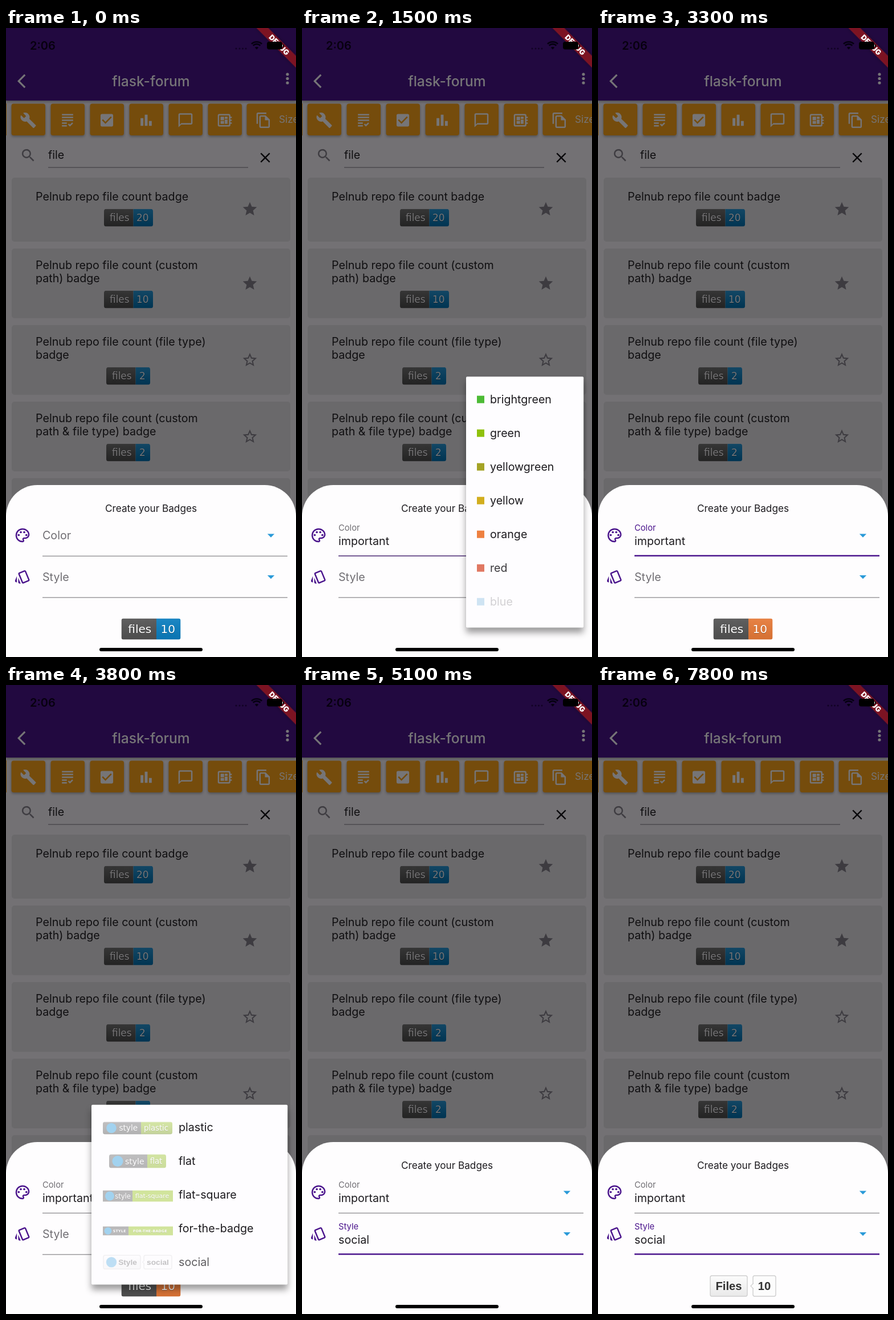
An HTML page for the animation above (8 s loop, 509 by 1101 pixels).

```html
<!DOCTYPE html>
<html lang="en">
<head>
<meta charset="utf-8">
<title>Badge builder</title>
<style>
html, body { margin: 0; width: 100%; height: 100%; overflow: hidden; background: #737174; }
svg { display: block; width: 509px; height: 1101px; }
text { font-family: Inter, Roboto, sans-serif; font-optical-sizing: none; white-space: pre; }
.badge { font-family: "DejaVu Sans", Verdana, sans-serif; }
.social { font-family: "Liberation Sans", Arial, sans-serif; font-weight: 700; }
.raised { filter: drop-shadow(0 2px 2px rgba(0,0,0,.3)); }
.menu { filter: drop-shadow(0 9px 6px rgba(0,0,0,.38)); }
</style>
</head>
<body>
<svg id="stage" viewBox="0 0 509 1101" xmlns="http://www.w3.org/2000/svg"></svg>
<script>
const LOOP = 8000, STEP = 100, BODY = 19.67, ROW = 59.01, PAD = 9.84, BOTTOM = 1049.4, RIGHT = 494.2;
const PURPLE = [74, 20, 140], GREY = [112, 110, 115], RULE = [137, 135, 139];
const INK = '#1d1b1f', PALE = '#767577', ORANGE = '#ec7c38';
const stage = document.getElementById('stage');
const $ = id => document.getElementById(id);
const clamp = x => Math.max(0, Math.min(1, x));
const mix = (a, b, k) => `rgb(${a.map((c, i) => Math.round(c + (b[i] - c) * k))})`;

const ICONS = {
  build: 'M22.7 19l-9.1-9.1c.9-2.3.4-5-1.5-6.9-2-2-5-2.4-7.4-1.3L9 6 6 9 1.6 4.7C.4 7.1.9 10.1 2.9 12.1c1.9 1.9 4.6 2.4 6.9 1.5l9.1 9.1c.4.4 1 .4 1.4 0l2.3-2.3c.5-.4.5-1.1.1-1.4z',
  grading: 'M4 3h16v2H4zM4 7h16v2H4zM4 11h16v2H4zM4 15h7v2H4zM4 19h7v2H4zM15.4 18.2L14 16.75l-1.4 1.4L15.4 21 20 16.4 18.6 15z',
  check: 'M19 3H5c-1.1 0-2 .9-2 2v14c0 1.1.9 2 2 2h14c1.1 0 2-.9 2-2V5c0-1.1-.9-2-2-2zm-9 14l-5-5 1.4-1.4L10 14.17l7.6-7.6L19 8z',
  chart: 'M4 9h4v11H4zM10 4h4v16h-4zM16 13h4v7h-4z',
  chat: 'M20 2H4c-1.1 0-2 .9-2 2v18l4-4h14c1.1 0 2-.9 2-2V4c0-1.1-.9-2-2-2zm0 14H6l-2 2V4h16z',
  board: 'M22 9V7h-2V5c0-1.1-.9-2-2-2H4c-1.1 0-2 .9-2 2v14c0 1.1.9 2 2 2h14c1.1 0 2-.9 2-2v-2h2v-2h-2v-2h2v-2h-2V9zm-4 10H4V5h14zM6 13h5v4H6zM12 7h4v3h-4zM6 7h5v5H6zM12 11h4v6h-4z',
  copy: 'M16 1H4c-1.1 0-2 .9-2 2v14h2V3h12zM15 5H8c-1.1 0-2 .9-2 2v14c0 1.1.9 2 2 2h11c1.1 0 2-.9 2-2V11zM8 21V7h6v5h5v9z',
  search: 'M15.5 14h-.8l-.3-.3A6.5 6.5 0 1 0 13.7 14.4l.3.3v.8l5 5 1.5-1.5zm-6 0a4.5 4.5 0 1 1 0-9 4.5 4.5 0 0 1 0 9z',
  close: 'M19 6.4L17.6 5 12 10.6 6.4 5 5 6.4 10.6 12 5 17.6 6.4 19 12 13.4 17.6 19 19 17.6 13.4 12z',
  star: 'M12 17.27L18.18 21l-1.64-7.03L22 9.24l-7.19-.61L12 2 9.19 8.63 2 9.24l5.46 4.73L5.82 21z',
  hollow: 'M22 9.24l-7.19-.62L12 2 9.19 8.63 2 9.24l5.46 4.73L5.82 21 12 17.27 18.18 21l-1.63-7.03zM12 15.4l-3.76 2.27 1-4.28-3.32-2.88 4.38-.38L12 6.1l1.71 4.04 4.38.38-3.32 2.88 1 4.28z',
  back: 'M11.67 3.87L9.9 2.1 0 12l9.9 9.9 1.77-1.77L3.54 12z',
  drop: 'M7 10l5 5 5-5z',
  palette: 'M12 22A10 10 0 0 1 12 2c5.5 0 10 4 10 9 0 3.3-2.7 6-6 6h-1.8c-.5 0-.7.4-.4.8.4.5.7 1.1.7 1.7 0 1.4-1.1 2.5-2.5 2.5zm0-18a8 8 0 0 0 0 16c.5 0 .6-.5.4-.85-.4-.5-.65-1.05-.65-1.65 0-1.4 1.1-2.5 2.5-2.5H16c2.2 0 4-1.8 4-4 0-3.9-3.6-7-8-7z',
  style: 'M2.5 19.65l1.4.56v-9.03l-2.46 5.86c-.4 1 .08 2.2 1.06 2.6zM22 15.95L17.07 4c-.4-1-1.6-1.5-2.6-1.1L7.1 5.95c-1 .4-1.5 1.6-1.1 2.6L11 20.5c.4 1 1.6 1.5 2.6 1.1l7.3-3.05c1-.4 1.5-1.6 1.1-2.6zm-9.2 3.8L7.87 7.8l7.35-3.04 4.96 11.95zM5.88 19.75c0 1.1.9 2 2 2h1.45l-3.45-8.34z'
};

const rect = (x, y, w, h, fill, extra = '') =>
  `<rect x="${x}" y="${y}" width="${w}" height="${h}" fill="${fill}" ${extra}/>`;
const circle = (x, y, r, fill, extra = '') => `<circle cx="${x}" cy="${y}" r="${r}" fill="${fill}" ${extra}/>`;
const text = (x, cy, s, size = BODY, fill = INK, extra = '') =>
  `<text x="${x}" y="${cy + size * .36}" font-size="${size}" fill="${fill}" ${extra}>${s}</text>`;
const MID = 'text-anchor="middle"';

function icon(name, cx, cy, fill, size = 29.5) {
  const at = `translate(${cx - size / 2} ${cy - size / 2}) scale(${size / 24})`;
  return `<path d="${ICONS[name]}" fill="${fill}" fill-rule="evenodd" transform="${at}"/>`;
}

// Two-part badge: dark label on the left, coloured value on the right.
function badge(o) {
  const { x, y, w, h, split, left, right, size, color } = o;
  const { r = 4, dark = '#555', ink = '#fff', logo = 0, gloss = 'url(#gloss)', extra = '', value = size } = o;
  const id = 'clip' + x + '-' + y + color.slice(1);
  const label = (cx, s, fs) => ['#010101', ink].map((c, i) =>
    text(cx, y + h / 2 + 1 - i, s, fs, c, `${MID} class="badge" ${extra} ${i ? '' : 'opacity=".3"'}`)).join('');
  return `<clipPath id="${id}">${rect(x, y, w, h, '#000', `rx="${r}"`)}</clipPath><g clip-path="url(#${id})">` +
    rect(x, y, split, h, dark) + rect(x + split, y, w - split, h, color) + rect(x, y, w, h, gloss) + '</g>' +
    (logo ? circle(x + logo, y + h / 2, h * .4, '#1b93d8') : '') +
    label(x + split / 2 + (logo ? logo * .75 : 1.5), left, size) + label(x + (split + w) / 2 - 1, right, value);
}

function social(x, y, w, h, bubble, bw, left, right, size, logo) {
  const edge = 'stroke="#cfcfcf" stroke-width="1.4" rx="3"', my = y + h / 2, q = h * .14;
  return rect(x, y, w, h, 'url(#silver)', edge) + rect(bubble, y, bw, h, '#fcfcfc', edge) +
    `<path d="M${bubble + 1} ${my - q}l${-q} ${q} ${q} ${q}" fill="#fcfcfc" stroke="#cfcfcf" stroke-width="1.2"/>` +
    (logo ? circle(x + 14, my, h * .38, '#1b93d8') : '') +
    text(x + w / 2 + (logo ? 10 : 0), my, left, size, '#333', MID + ' class="social"') +
    text(bubble + bw / 2, my, right, size, '#333', MID + ' class="social"');
}

function header() {
  const arcs = [4.5, 9, 13].map((r, i) => {
    const d = r * .7;
    return i ? `<path d="M${440 - d} ${37 - d}A${r} ${r} 0 0 1 ${440 + d} ${37 - d}" fill="none" stroke="#050010" stroke-width="2.6"/>`
      : `<path d="M440 37.5l${-d} ${-d}a${r} ${r} 0 0 1 ${2 * d} 0z" fill="#050010"/>`;
  }).join('');
  return rect(0, 0, 509, 127, '#220940', 'class="raised"') +
    text(42, 31, '2:06', 20, '#07000f', 'font-weight="600"') +
    [404, 410, 415.5, 421].map(x => circle(x, 36, 1.5, '#0a0018', 'opacity=".7"')).join('') + arcs +
    icon('back', 34.75, 93, PALE) +
    text(254.5, 93, 'flask-forum', 24.6, PALE, MID + ' font-weight="500"') +
    [81, 88.5, 96].map(y => circle(494, y, 2.6, PALE)).join('');
}

function toolbar() {
  const fill = '#754c0c';
  const names = ['build', 'grading', 'check', 'chart', 'chat', 'board'];
  return rect(-10, 132, 11, 56, fill) + names.map((n, i) =>
    rect(9.5 + 69 * i, 132.5, 59.5, 55.5, fill, 'rx="4" class="raised"') + icon(n, 39 + 69 * i, 161.5, PALE)).join('') +
    rect(422.5, 132.5, 120, 55.5, fill, 'rx="4" class="raised"') + icon('copy', 452, 161.5, PALE) +
    text(479, 160, 'Size', 17.2, PALE);
}

function list() {
  const rows = [
    [262, 112, 20, true, 'Pelnub repo file count badge'],
    [386, 122, 10, true, 'Pelnub repo file count (custom', 'path) badge'],
    [520, 122, 2, false, 'Pelnub repo file count (file type)', 'badge'],
    [654, 122, 2, false, 'Pelnub repo file count (custom', 'path &amp; file type) badge']
  ];
  const dark = '#100f11', card = '#6a696b';
  return icon('search', 39, 223, '#3f3d42') + text(74, 221.5, 'file', BODY, dark) +
    rect(74, 243.5, 351, 1.2, '#434146') + icon('close', 455, 227, '#08070a') +
    rect(10, 788, 489, 60, card, 'rx="5"') +
    rows.map(([y, h, n, on, ...lines]) => {
      const wide = n > 9, two = lines.length > 1;
      return rect(10, y, 489, h, card, 'rx="5"') +
        lines.map((s, i) => text(52, y + (two ? 28.6 : 33) + 23.4 * i, s, BODY, dark)).join('') +
        icon(on ? 'star' : 'hollow', 428, y + (two ? 61 : 55), '#3d3b40') +
        badge({ x: wide ? 172 : 176, y: y + (two ? 73.7 : 54.7), w: wide ? 86 : 77, h: 30.7, split: 51.5,
          left: 'files', right: n, size: 16.8, color: '#003a5b', dark: '#272727', ink: PALE });
    }).join('');
}

function field(id, name, cy) {
  return icon(id === 'color' ? 'palette' : 'style', 29, cy, `rgb(${PURPLE})`) +
    `<text id="${id}-label" x="64">${name}</text>` +
    text(64, cy + 10, id === 'color' ? 'important' : 'social', BODY, INK, `id="${id}-value"`) +
    icon('drop', 465, cy, '#2a9ad8') + rect(64, cy, 430, 0, '#000', `id="${id}-line"`);
}

function sheet() {
  const big = color => badge({ x: 202.5, y: 1033.5, w: 104, h: 37, split: 61.5, left: 'files', right: '10', size: 20, color });
  return `<path d="M0 1101V855a55 55 0 0 1 55-55h399a55 55 0 0 1 55 55v246z" fill="#fefdfe"/>` +
    text(254.5, 841, 'Create your Badges', 17.2, INK, MID) +
    field('color', 'Color', 888) + field('style', 'Style', 960.5) +
    [[22.3, 887.5], [26, 882.5], [32, 882.5], [35.8, 887.5]].map(([x, y]) =>
      circle(x, y, 1.85, `rgb(${PURPLE})`)).join('') +
    `<g id="first">${big('#0a80c4')}</g><g id="second">${big(ORANGE)}</g>` +
    `<g id="third">${social(197, 1034, 65, 36, 272, 40, 'Files', '10', 20.2)}</g>` +
    rect(164, 1085, 181, 6, '#000', 'rx="3"');
}

const COLORS = `brightgreen 4cbb35,green 8fc10c,yellowgreen a4a325,yellow d2ae1e,orange ee8040,red dc6349,blue 0e80c4,
lightgrey 9f9f9f,success 4cbb35,important ee8040,critical dc6349,informational 0e80c4,inactive 9f9f9f,
blueviolet 7f3fca,pink c766b8,lightblue 94c8ee`.split(',').map(s => s.trim().split(' '));

const colorItems = COLORS.map(([name, hex]) => rect(19, 23.5, 13, 13, '#' + hex) + text(42, 29.5, name));

const GREEN = '#8fc00a';
const styleItems = [
  badge({ x: 20, y: 20, w: 122, h: 22, split: 67, left: 'style', right: 'plastic', size: 13.6, value: 13.2, color: GREEN, logo: 15, gloss: 'url(#plastic)' }),
  badge({ x: 31, y: 18, w: 100, h: 24, split: 67, left: 'style', right: 'flat', size: 14, value: 13.2, color: GREEN, logo: 15 }),
  badge({ x: 20, y: 22, w: 123, h: 20, split: 52, left: 'style', right: 'flat-square', size: 11.5, value: 11, color: GREEN, logo: 12, r: 0, gloss: 'none' }),
  badge({ x: 20, y: 26, w: 123, h: 16, split: 45, left: 'STYLE', right: 'FOR-THE-BADGE', size: 6.2, value: 6.2, color: GREEN, logo: 9, r: 0, gloss: 'none', extra: 'font-weight="700" letter-spacing=".3"' }),
  social(21, 17.7, 65, 24, 92, 49, 'Style', 'social', 13.7, true)
].map((art, i) => `<g class="art">${art}</g>` +
  text(153, 29.5, ['plastic', 'flat', 'flat-square', 'for-the-badge', 'social'][i]));

const MENUS = [
  { id: 'colors', items: colorItems, width: 206.2, anchor: 864, open: 0, tap: 1200, close: 1283.3, pick: 9, touch: 90 },
  { id: 'styles', items: styleItems, width: 344.2, anchor: 937, open: 3520, tap: 4700, close: 4783.3, pick: 4, touch: 181 }
];

function menu(m) {
  return `<clipPath id="${m.id}-clip">${rect(0, 0, 0, 0, '#000')}</clipPath><g id="${m.id}" class="menu">` +
    rect(0, 0, 0, 0, '#fefdff', 'rx="2"') + `<g clip-path="url(#${m.id}-clip)"><g class="body">` +
    m.items.map((s, i) => `<g class="item" transform="translate(0 ${PAD + ROW * i})">` +
      (i === m.pick ? `<g class="ink">${rect(0, 0, m.width, ROW, '#000', 'opacity=".035"')}` +
        circle(m.touch, 29, 10, '#000', 'opacity=".1"') + '</g>' : '') + s + '</g>').join('') + '</g></g></g>';
}

const banner = `<g transform="translate(509 0) rotate(45)">` +
  rect(-49.2, 34.4, 98.4, 14.8, 'rgba(183,28,28,.63)', 'style="filter:drop-shadow(0 0 3px rgba(0,0,0,.5))"') +
  text(0, 41.8, 'DEBUG', 12.8, '#fff', MID + ' font-weight="900"') + '</g>' +
  rect(458, 24, 27, 13.5, '#000', 'rx="4"') + rect(486, 28.5, 2, 5, '#000', 'rx="1"');

const grad = (id, stops) => `<linearGradient id="${id}" x2="0" y2="1">` +
  stops.map(([o, c, a]) => `<stop offset="${o}" stop-color="${c}" stop-opacity="${a}"/>`).join('') + '</linearGradient>';

stage.innerHTML = '<defs>' + grad('gloss', [[0, '#bbb', .1], [1, '#000', .1]]) +
  grad('plastic', [[0, '#fff', .45], [.1, '#bbb', .1], [.9, '#000', .2], [1, '#000', .45]]) +
  grad('silver', [[0, '#fcfcfc', 1], [1, '#e9e9e9', 1]]) + '</defs>' +
  rect(0, 0, 509, 1101, '#737174') + header() + toolbar() + list() + sheet() + MENUS.map(menu).join('') + banner;

function set(el, attrs) {
  for (const k in attrs) el.setAttribute(k, attrs[k]);
}

function drawMenu(m, t) {
  const v = clamp(Math.min((t - m.open) / 300, (1 - (t - m.close) / 300) * 1.5));
  const n = m.items.length, unit = 1 / (n + 1.5), el = $(m.id);
  const w = m.width * clamp(v / unit), h = (n * ROW + 2 * PAD) * clamp(v / (n * unit));
  const size = { width: w, height: h };
  const x = RIGHT - w, y = Math.min(m.anchor, BOTTOM - h);
  set(el, { transform: `translate(${x} ${y})`, opacity: clamp(v * 3), visibility: v > 0 ? 'visible' : 'hidden' });
  set(el.querySelector('rect'), size);
  set($(m.id + '-clip').firstChild, size);
  set(el.querySelector('.body'), { transform: `translate(${w - m.width} 0)` });
  el.querySelectorAll('.item').forEach((g, i) => set(g, { opacity: clamp((v - (i + 1) * unit) / (1.5 * unit)) }));
  set(el.querySelector('.ink'), { opacity: t >= m.tap ? 1 : 0 });
  set(el.querySelector('.ink circle'), { r: 10 + Math.max(0, t - m.tap) * .1 });
  el.querySelectorAll('.art').forEach(g => set(g, { opacity: clamp((t - m.open - 80) / 500) }));
}

function drawField(id, cy, t, pick, blur) {
  const up = clamp((t - pick) / 200), focus = clamp((t - pick - 100) / 200) - clamp((t - blur) / 200);
  const size = BODY - 4.92 * up, thick = 1.23 * (1 + focus);
  set($(id + '-label'), { y: cy - 13 * up + size * .36, 'font-size': size, fill: mix(GREY, PURPLE, clamp(focus * 2 - 1)) });
  set($(id + '-value'), { opacity: t >= pick ? 1 : 0 });
  set($(id + '-line'), { y: cy + 37 - thick, height: thick, fill: mix(RULE, PURPLE, focus) });
}

function draw(t) {
  const fade = start => clamp((t - start) / 700) ** 1.8;
  MENUS.forEach(m => drawMenu(m, t));
  drawField('color', 888, t, 1300, 3500);
  drawField('style', 960.5, t, 4800, LOOP);
  set($('first'), { opacity: t < 1300 ? 1 : 0 });
  set($('second'), { opacity: t < 4800 ? fade(2300) : 0 });
  set($('third'), { opacity: fade(5800) });
}

const begin = performance.now();
let last = -1;
function tick() {
  const t = Math.floor((performance.now() - begin) % LOOP / STEP) * STEP;
  if (t !== last) draw(last = t);
  requestAnimationFrame(tick);
}
tick();
</script>
</body>
</html>
```
